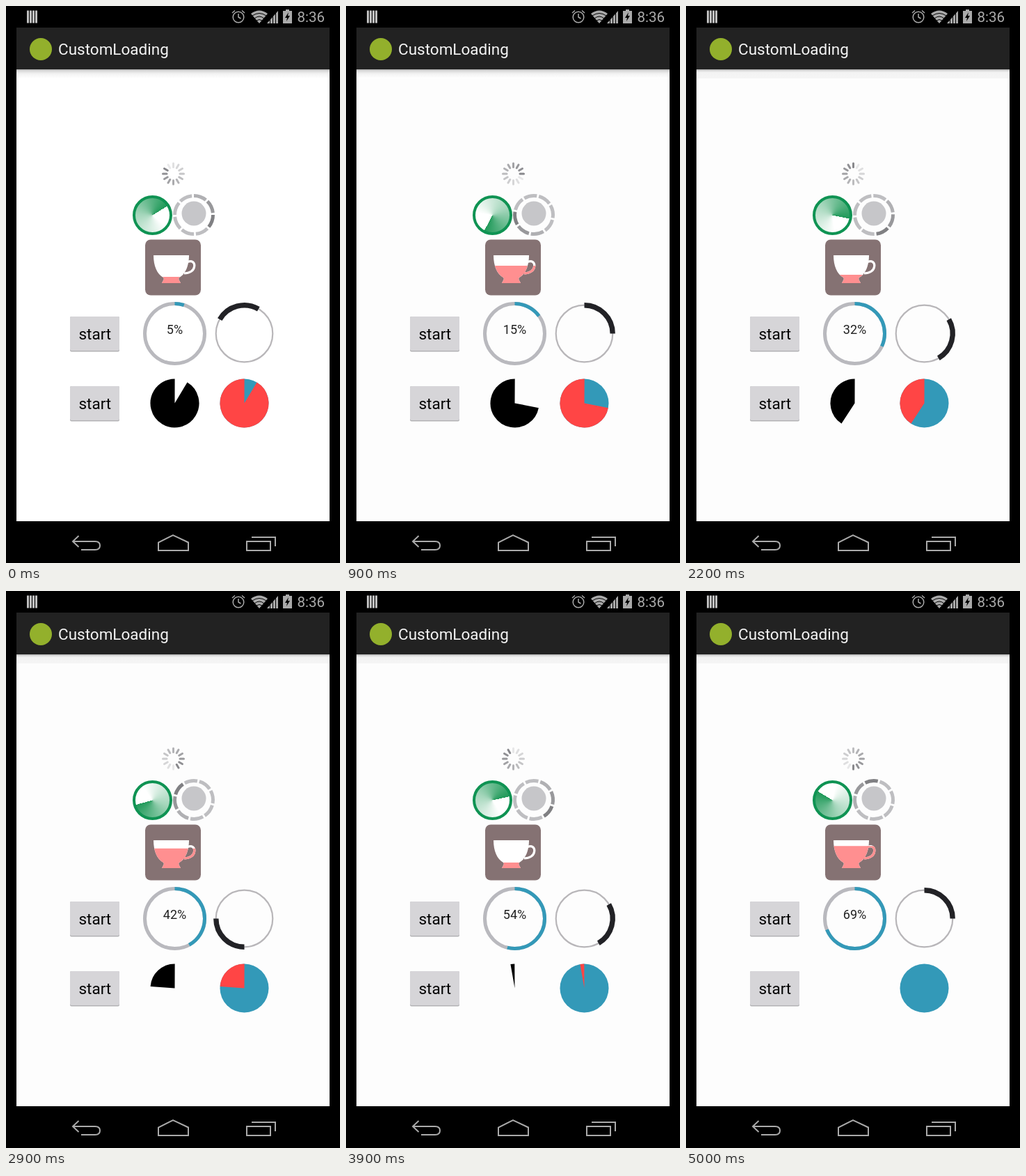
Animation of 480x800 px, one loop 5.1 s. Source, as an HTML page:

```html
<!DOCTYPE html>
<html lang="en">
<head>
<meta charset="utf-8">
<title>CustomLoading</title>
<style>
  html, body { margin: 0; width: 100%; height: 100%; overflow: hidden; background: #000; }
  #stage { position: relative; width: 480px; height: 800px; overflow: hidden; }
  svg { position: absolute; left: 0; top: 0; display: block; }
  text { font-family: Roboto, sans-serif; }
  #radar {
    position: absolute; left: 181.5px; top: 272px; width: 49px; height: 49px;
    border: 4px solid #0f9353; border-radius: 50%; background-origin: border-box;
  }
</style>
</head>
<body>
<div id="stage">
<svg width="480" height="800" viewBox="0 0 480 800">
  <defs>
    <linearGradient id="fade" x1="0" y1="0" x2="0" y2="1">
      <stop offset="0" stop-color="#b4b4b4"/>
      <stop offset=".2" stop-color="#dedede"/>
      <stop offset=".5" stop-color="#f3f3f3"/>
      <stop offset="1" stop-color="#fff"/>
    </linearGradient>
    <linearGradient id="band" x1="0" y1="0" x2="0" y2="1">
      <stop offset="0" stop-color="#b4b4b4"/>
      <stop offset=".2" stop-color="#e4e4e4"/>
      <stop offset=".35" stop-color="#f3f3f3"/>
      <stop offset="1" stop-color="#f5f5f5"/>
    </linearGradient>
    <clipPath id="level"><rect id="fill" x="205" y="398" width="70" height="40"/></clipPath>
    <g id="cup">
      <path fill="currentColor" d="M212 358H263C263 373 258 385 249 390C247 392 249 394 251 398H224C226 394 228 392 226 390C217 385 212 373 212 358Z"/>
      <path fill="none" stroke="currentColor" stroke-width="3.2" d="M261 367.500C267 365 271.500 368 270.700 374C270 380 264 384 256 384"/>
    </g>
    <g id="button">
      <rect x="92" y="446" width="71" height="50.500" rx="2" fill="#b2b2b4"/>
      <rect x="92" y="446" width="71" height="49" rx="2" fill="#d6d5d8"/>
      <text x="127.800" y="479" font-size="22.5" text-anchor="middle">start</text>
    </g>
  </defs>

  <rect width="480" height="800"/>
  <rect id="page" x="15" y="31" width="450" height="709" fill="#fff"/>
  <rect id="shade" x="15" y="91" width="450" height="13"/>
  <rect x="15" y="31" width="450" height="60" fill="#222"/>
  <circle cx="50" cy="62" r="16" fill="#93b02c"/>
  <text x="75" y="70" font-size="22.5" fill="#f4f4f4">CustomLoading</text>

  <!-- status bar -->
  <g fill="#aaa">
    <path d="M30 6.500h15v18h-15z" fill="#c0c0c0"/>
    <path d="M364 25L352 11Q364 2 376 11Z"/>
    <path d="M375 25L391 7V25Z"/>
    <path d="M402 5h5v2h4v18h-13V7h4z"/>
    <text x="418.500" y="23" font-size="20.5">8:36</text>
  </g>
  <g fill="none" stroke="#000">
    <path d="M33.500 6V25M37.500 6V25M41.500 6V25"/>
    <path d="M354 14Q364 7 374 14M357 18Q364 12 371 18M360 21Q364 18 368 21"/>
    <path d="M379.500 6V26M383.500 6V26M387.500 6V26"/>
  </g>
  <path d="M406 9L401 17H404L403 22L408 14H405Z"/>
  <g fill="none" stroke="#aaa" stroke-width="1.5">
    <circle cx="334" cy="16" r="7.800"/>
    <path d="M334 11V16L337.500 18M325 10L329 6.500M343 10L339 6.500"/>
  </g>

  <!-- navigation bar -->
  <g fill="none" stroke="#aaa" stroke-width="2">
    <path d="M104.500 761L96 769L104.500 777M96 769H128Q135 769 135 775T128 781H108"/>
    <path d="M219 782V770.500L240 760L262 770.500V782Z"/>
    <path d="M346 769H380V782H346ZM353 763H387V776"/>
  </g>

  <g id="spokes" stroke="#88888c" stroke-width="3" stroke-linecap="round"></g>
  <g id="dashes" fill="none" stroke-width="5"></g>
  <circle cx="270" cy="298" r="17.500" fill="#c6c6c9"/>

  <rect x="200" y="335.500" width="80" height="80" rx="8" fill="#857273"/>
  <use href="#cup" color="#fff"/>
  <g clip-path="url(#level)"><use href="#cup" color="#ff8f90"/></g>

  <use href="#button"/>
  <use href="#button" y="100"/>

  <g fill="none">
    <circle cx="242.500" cy="470.500" r="43" stroke="#b9b9be" stroke-width="5"/>
    <circle id="done" cx="242.500" cy="470.500" r="43" stroke="#3399b8" stroke-width="5" pathLength="360"/>
    <circle cx="342.500" cy="470.500" r="40.800" stroke="#b8b6b9" stroke-width="2.200"/>
    <circle id="sweep" cx="342.500" cy="470.500" r="40.700" stroke="#222226" stroke-width="7.400" pathLength="360"/>
    <circle id="black" cx="242.500" cy="570.500" r="17.500" stroke="#000" stroke-width="35" pathLength="360"/>
    <circle cx="342.500" cy="570.500" r="35" fill="#3399b8"/>
    <circle id="red" cx="342.500" cy="570.500" r="17.500" stroke="#ff4545" stroke-width="35" pathLength="360"/>
  </g>
  <text id="label" x="242.500" y="470.500" font-size="18" text-anchor="middle" fill="#222"></text>
</svg>
<div id="radar"></div>
</div>

<script>
const LOOP = 5100, STEP = 100;

// time in ms, progress in percent, pie angle in degrees
const KEYS = [
  [0, 5.2, 31], [900, 15.2, 101], [1700, 26.4, 174], [2200, 32.1, 213],
  [2900, 42.3, 274], [3900, 54.5, 350], [5000, 69.4, 434]
];

const $ = id => document.getElementById(id);
const mod = (a, n) => ((a % n) + n) % n;

function add(parent, tag, attrs) {
  const el = document.createElementNS('http://www.w3.org/2000/svg', tag);
  for (const k in attrs) el.setAttribute(k, attrs[k]);
  parent.appendChild(el);
  return el;
}

// Angles run clockwise from twelve o'clock.
function arc(el, from, span) {
  el.setAttribute('stroke-dasharray', `${span} 360`);
  el.setAttribute('visibility', span > 0 ? 'visible' : 'hidden');
  el.setAttribute('transform',
    `rotate(${from - 90} ${el.getAttribute('cx')} ${el.getAttribute('cy')})`);
}

const spokes = Array.from({ length: 12 }, (_, i) => add($('spokes'), 'line', {
  x1: 240.5, y1: 231.5, x2: 240.5, y2: 226, transform: `rotate(${i * 30} 240.5 241)`
}));

// Dashes trail behind the leading one, growing lighter.
const dashes = Array.from({ length: 8 }, (_, i) => {
  const tone = Math.min(190, 128 + i * 24);
  return add($('dashes'), 'circle', {
    cx: 270, cy: 300, r: 27.5, pathLength: 360, stroke: `rgb(${tone},${tone},${tone + 3})`
  });
});

function sample(t) {
  let i = 1;
  while (i < KEYS.length - 1 && t > KEYS[i][0]) i++;
  const a = KEYS[i - 1], b = KEYS[i], u = (t - a[0]) / (b[0] - a[0]);
  return [1, 2].map(c => a[c] + (b[c] - a[c]) * u);
}

function draw(t) {
  const [progress, pie] = sample(t);
  const run = progress - KEYS[0][1];
  const turn = 60 + run * 15;

  $('page').setAttribute('fill', t < 700 ? '#fff' : '#fdfdfd');
  $('shade').setAttribute('fill', t < 1300 ? 'url(#fade)' : 'url(#band)');

  const head = Math.round((turn - 110) / 30);
  spokes.forEach((el, i) => el.setAttribute('opacity', 1 - mod(head - i, 12) * 0.075));

  $('radar').style.backgroundImage =
    `conic-gradient(from ${turn - 2}deg, #fff 0deg, #fff 70deg, #a4d6bb 215deg, #219a5a 360deg)`;
  dashes.forEach((el, i) => arc(el, turn + 30 - i * 45, 39));

  const level = mod(9 + run * 1.6, 40);
  $('fill').setAttribute('y', 398 - (level < 3.2 ? 0 : level));

  arc($('done'), 0, Math.floor(progress) * 3.6);
  $('label').textContent = Math.floor(progress) + '%';
  arc($('sweep'), 300 + 60 * Math.floor(run * 0.77 + 0.2), 90);

  const open = Math.min(360, pie);
  arc($('black'), open, 360 - open);
  arc($('red'), open, 360 - open);
}

const start = performance.now();
function tick() {
  const t = (performance.now() - start) % LOOP;
  draw(Math.floor(t / STEP) * STEP);
  requestAnimationFrame(tick);
}
tick();
</script>
</body>
</html>
```
